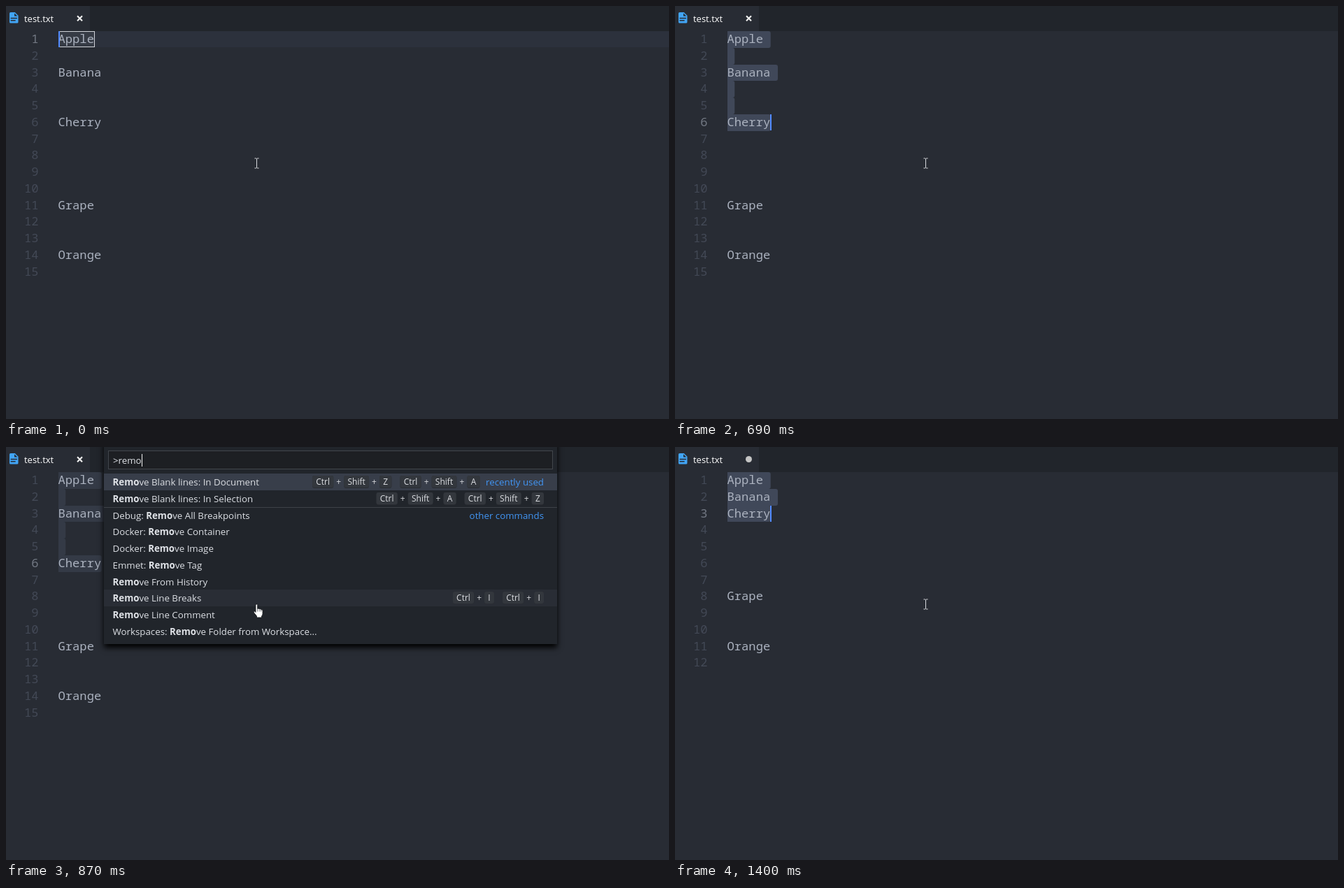
An HTML page with a canvas that plays this animation: 948x591 px, repeating every 1550 ms.

```html
<!DOCTYPE html>
<html lang="en">
<head>
<meta charset="utf-8">
<title>Remove blank lines</title>
<style>
html, body { margin: 0; height: 100%; overflow: hidden; background: #282c34; }
canvas { display: block; }
</style>
</head>
<body>
<canvas id="stage" width="948" height="591"></canvas>
<script>
const ctx = document.getElementById('stage').getContext('2d');
const LOOP = 1550;
const LINE = 23.77, ROW = 23.75, CHAR = 10.29, LEFT = 75;
const MONO = '17.15px "Noto Sans Mono", monospace';
const UI = '"Open Sans", "Noto Sans", sans-serif';
const BODY = `13.3px ${UI}`, BOLD = `bold 13.3px ${UI}`, SMALL = `12px ${UI}`;

const before = ['Apple', '', 'Banana', '', '', 'Cherry', '', '', '', '', 'Grape', '', '', 'Orange', ''];
const after = ['Apple', 'Banana', 'Cherry', ...before.slice(6)];

// Each command: title, key chords, optional label
const recent = [
  ['Remove Blank lines: In Document', 'Ctrl+Shift+Z Ctrl+Shift+A', 'recently used'],
  ['Remove Blank lines: In Selection', 'Ctrl+Shift+A Ctrl+Shift+Z']
];
const broad = [
  recent[0],
  ['Developer: Reload Window'],
  recent[1],
  ['Developer: Reload Webviews'],
  ['Preferences: Open Settings (JSON)'],
  ['Preferences: Open Settings (UI)'],
  ['Preferences: Open User Settings'],
  ['Focus Breadcrumbs', 'Ctrl+Shift+.'],
  ['Preferences: Color Theme', 'Ctrl+K Ctrl+T'],
  ['File: Compare Active File with Clipboard', 'Ctrl+K C'],
  ['TypeScript Importer: Reindex TypeScript Importer'],
  ['Increment Selection', 'Ctrl+Alt+I'],
  ['Emmet: Increment by 1'],
  ['Debug: Restart', 'Ctrl+Shift+F5']
];
const narrow = [
  ...recent,
  ['Debug: Remove All Breakpoints', '', 'other commands'],
  ['Docker: Remove Container'],
  ['Docker: Remove Image'],
  ['Emmet: Remove Tag'],
  ['Remove From History'],
  ['Remove Line Breaks', 'Ctrl+I Ctrl+I'],
  ['Remove Line Comment'],
  ['Workspaces: Remove Folder from Workspace...']
];
const typed = [[730, ''], [765, 'r'], [800, 're'], [820, 'rem'], [870, 'remo'], [980, 'remove']];

const lineTop = n => Math.round(36 + LINE * n);

function rect(x, y, w, h, color) {
  ctx.fillStyle = color;
  ctx.fillRect(x, y, w, h);
}

function round(x, y, w, h, r, color) {
  ctx.fillStyle = color;
  ctx.beginPath();
  ctx.roundRect(x, y, w, h, r);
  ctx.fill();
}

function frame(x, y, w, h, color) {
  ctx.strokeStyle = color;
  ctx.lineWidth = 1;
  ctx.strokeRect(x + .5, y + .5, w - 1, h - 1);
}

// Returns the x where the text ends
function text(str, x, y, color, font, align = 'left') {
  ctx.font = font;
  ctx.fillStyle = color;
  ctx.textAlign = align;
  ctx.fillText(str, x, y);
  return x + ctx.measureText(str).width;
}

function path(d, x, y, fill, stroke, width = 1) {
  const shape = new Path2D(d);
  ctx.save();
  ctx.translate(x, y);
  if (fill) { ctx.fillStyle = fill; ctx.fill(shape); }
  if (stroke) { ctx.strokeStyle = stroke; ctx.lineWidth = width; ctx.stroke(shape); }
  ctx.restore();
}

function drawTab(dirty) {
  rect(0, 0, 948, 36, '#21252b');
  rect(0, 0, 120, 36, '#282c34');
  path('M1.6 0H7.8L12.5 4.7V14Q12.5 15.6 10.9 15.6H1.6Q0 15.6 0 14V1.6Q0 0 1.6 0Z', 5, 9, '#42a5f5');
  path('M7 1.2V5.5H11.3Z', 5, 9, '#282c34');
  path('M1.6 8.6H10.9M1.6 11.7H8.6', 5, 9, null, '#282c34', 1.5);
  text('test.txt', 26, 23, '#fff', `500 13px ${UI}`);
  if (dirty) round(101, 13, 9, 9, 4.5, '#c5c5c5');
  else path('M0 0L7 7M7 0L0 7', 102, 14.3, null, '#f0f0f0', 2.1);
}

function drawEditor(lines, row, col, selected, focused) {
  if (!selected) {
    rect(LEFT, 36, 948 - LEFT, 23, '#2c313c');
    rect(75, 36, 52, 23, '#363b45');
    frame(75, 36, 52, 23, '#cfd2d8');
  } else {
    const color = focused ? '#404859' : '#343a46';
    for (let i = 0; i <= row; i++) {
      const chars = i < row ? lines[i].length + 1 : col;
      if (chars) round(LEFT, lineTop(i), chars * CHAR, lineTop(i + 1) - lineTop(i), [0, 3, 3, 0], color);
    }
  }
  lines.forEach((line, i) => {
    const y = lineTop(i) + 17;
    text(i + 1, 46.5, y, i === row ? '#737984' : '#434956', MONO, 'right');
    text(line, LEFT - .5, y, '#abb2bf', MONO);
  });
  if (focused) rect(Math.round(LEFT + col * CHAR) - (col ? 1 : 0), lineTop(row), 2, 23, '#528bff');
}

// Chips are laid out from the right edge
function drawKeys(chords, right, y) {
  chords.split(' ').reverse().forEach(chord => {
    chord.split('+').reverse().forEach((key, i) => {
      if (i) {
        text('+', right - 7.5, y + 4, '#d4d6da', SMALL, 'center');
        right -= 15;
      }
      ctx.font = SMALL;
      const w = ctx.measureText(key).width + 10.5;
      round(right - w, y - 9, w, 18, 3, '#2b2e34');
      round(right - w, y - 9, w, 17, 3, '#33373d');
      text(key, right - w / 2, y + 4, '#dcdee2', SMALL, 'center');
      right -= w;
    });
    right -= 12;
  });
}

function drawPalette(query, caret) {
  const rows = query.length < 3 ? broad : narrow;
  const active = query === 'remove' ? 1 : 0;
  ctx.save();
  ctx.shadowColor = '#000';
  ctx.shadowBlur = 8;
  ctx.shadowOffsetY = 5;
  rect(140, -10, 648, 54.5 + ROW * rows.length, '#21252b');
  ctx.restore();

  rect(146, 5, 636, 27, '#1d1f23');
  frame(146, 5, 636, 27, '#42464c');
  const end = text('>' + query, 153, 24, '#dfe2e7', BODY);
  if (caret) rect(Math.ceil(end), 10, 1, 18, '#f0f0f0');

  rows.forEach(([title, keys, label], i) => {
    const top = Math.round(38 + ROW * i), y = top + 12;
    if (i === active) rect(140, top, 648, 24, '#383e4a');
    else if (rows === narrow && i === 7) rect(140, top, 648, 24, '#292d35');
    if (label === 'other commands') rect(140, top, 648, 1, '#3d4147');

    const at = title.toLowerCase().indexOf(query), stop = at + query.length;
    let x = text(title.slice(0, at), 152.5, y + 5, '#dcdfe4', BODY);
    x = text(title.slice(at, stop), x, y + 5, '#dfe2e7', BOLD);
    text(title.slice(stop), x, y + 5, '#dcdfe4', BODY);

    if (label) text(label, 769, y + 5, '#4296f5', BODY, 'right');
    if (keys) drawKeys(keys, label ? 677.5 : 769, y);
  });
}

function drawPointer(hand) {
  if (hand) {
    path('M3 12V1.8Q3 .5 4.3 .5T5.6 1.8V7Q7.6 5.8 8.2 7.5Q10 6.5 10.6 8.2Q13 7.4 13 10V14Q13 16 11.5 17.5V19.5H4.5V17.5L.5 12.5Q-.3 11 1 10.4Q2 10.2 3 12Z',
      354, 224.5, '#fff', '#15171b', .8);
    path('M5.6 7V11M8.2 8V11M10.6 8.5V11', 354, 224.5, null, '#30343a', .7);
  } else {
    path('M0 .5H2L3 1.2L4 .5H6M3 1V14M0 14.5H2L3 13.8L4 14.5H6', 355.5, 217.5, null, '#d8dade');
  }
}

function draw(now) {
  const t = now % LOOP;
  const open = t >= 730 && t < 1230;
  const cleaned = t >= 1270;
  const moves = Math.min(7, Math.floor((t - 110) / 25) + 1);
  const row = cleaned ? 2 : t < 110 ? 0 : Math.round(moves * 5 / 7);
  const col = t < 470 ? 0 : Math.min(6, Math.floor((t - 470) / 44) + 1);

  rect(0, 0, 948, 591, '#282c34');
  drawTab(t >= 1310);
  drawEditor(cleaned ? after : before, row, col, t >= 110, !open);
  if (open) drawPalette(typed.findLast(([start]) => t >= start)[1], t < 1010);
  drawPointer(open);
  requestAnimationFrame(() => draw(performance.now()));
}

draw(0);
</script>
</body>
</html>
```
